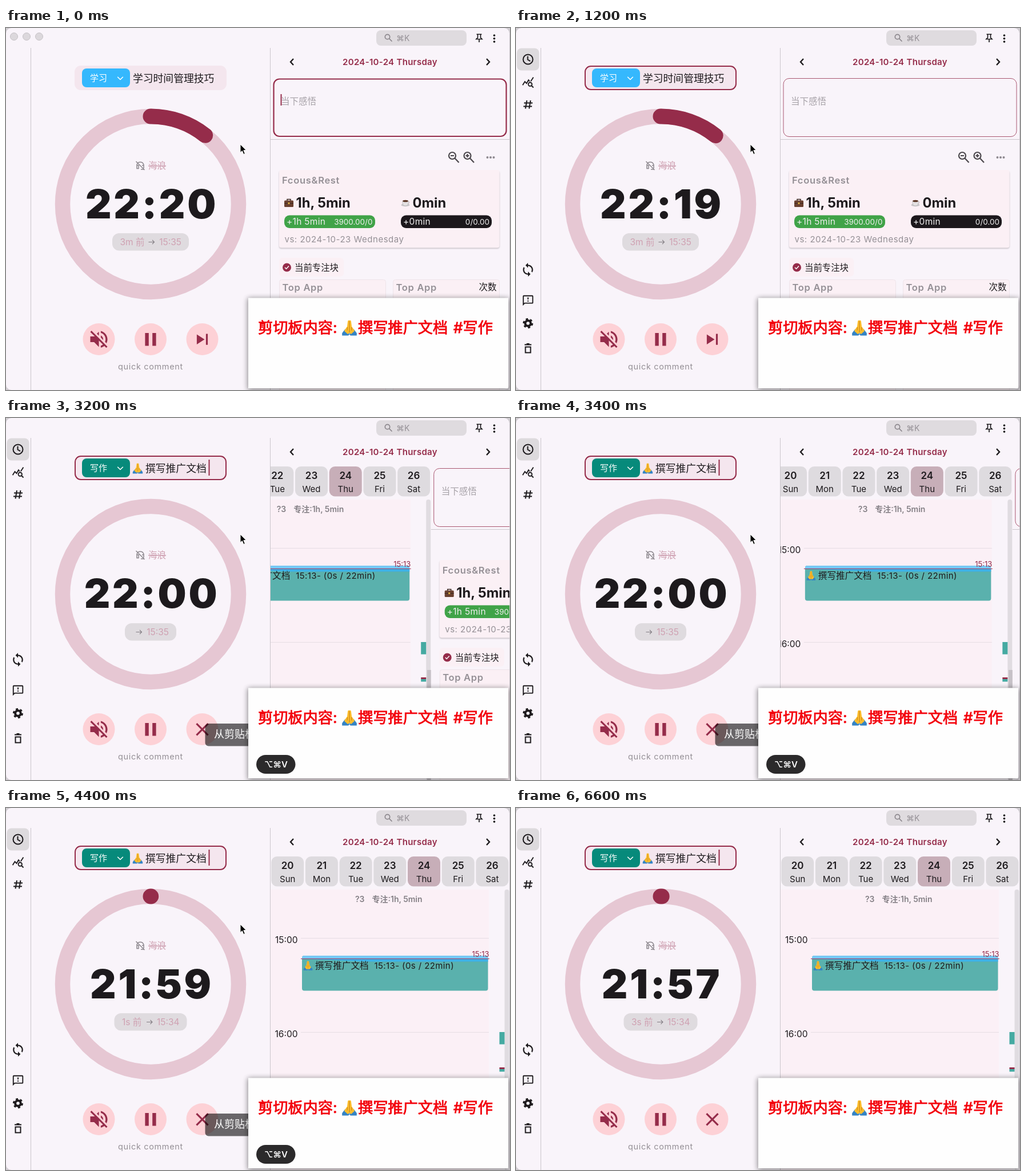
An HTML page that plays this animation: 882x635 px, repeating every 6800 ms.

```html
<!DOCTYPE html>
<html lang="zh">
<head>
<meta charset="utf-8">
<title>Focus timer</title>
<style>
  html, body { margin: 0; width: 100%; height: 100%; overflow: hidden; background: #d3cfd4; }
  svg.stage { display: block; width: 882px; height: 635px; }
  text { font: 400 15px Inter, "Noto Sans CJK SC", "DejaVu Sans", sans-serif; fill: #1d1a1d; }
  .mid { text-anchor: middle; }
  .end { text-anchor: end; }
  .gray { fill: #959096; }
  .wine { fill: #952c4a; }
  .rose { fill: #cfa1b2; font-size: 15.5px; }
  .white { fill: #fff; }
  .head { font-size: 16.5px; font-weight: 600; letter-spacing: .7px; }
  .big { font-size: 23.7px; font-weight: 700; }
  .stat { font-size: 15.5px; letter-spacing: .3px; fill: #eee; }
  .num { font-size: 13.5px; fill: #eee; }
  .title { font-size: 17.8px; }
  .clip { font-size: 26.2px; fill: #f3000b; stroke: #f3000b; stroke-width: .8px; }
  .focus { font-size: 14px; font-weight: 600; fill: #858086; }
  .timer { font-size: 70.5px; font-weight: 900; letter-spacing: 3.8px; }
  .line { fill: none; stroke: #1d1a1d; stroke-width: 2; }
  .rule { stroke: #cbc6cc; }
  #pages { animation: slide 6.8s infinite linear; }
  #pointer { animation: point 6.8s infinite linear; }
  @keyframes slide {
    0% { transform: translateX(0); }
    44.118% { transform: translateX(0); animation-timing-function: ease; }
    51.65%, 100% { transform: translateX(418px); }
  }
  @keyframes point {
    0% { transform: translate(410px, 204px); }
    66.2% { transform: translate(410px, 204px); animation-timing-function: ease-in-out; }
    76.5%, 100% { transform: translate(260px, 561px); }
  }
</style>
</head>
<body>
<svg class="stage" viewBox="0 0 882 635">
  <defs>
    <clipPath id="panel"><rect x="463" y="72" width="418" height="563"/></clipPath>
    <filter id="soft" x="-10%" y="-20%" width="120%" height="140%"><feGaussianBlur stdDeviation="5"/></filter>
    <filter id="faint" x="-5%" y="-10%" width="110%" height="120%"><feGaussianBlur stdDeviation="1"/></filter>
    <symbol id="pray" viewBox="0 0 24 24">
      <path d="M1 20l4.500-6 7 7-2 2.500H1zM23 20l-4.500-6-7 7 2 2.500H23z" fill="#3584c4"/>
      <path d="M12 1c-1.500-1-2.500 0-2.600 2L8.500 10 5 15l-.5 2 5 4.500 2.500-2 2.500 2 5-4.500-.5-2-3.500-5-.9-7c-.1-2-1.100-3-2.600-2z" fill="#fdbf2d"/>
      <path d="M12 2v17M9 11l-.5 5M15 11l.5 5" stroke="#c9831c" fill="none"/>
    </symbol>
    <symbol id="down" viewBox="0 0 10 6"><path d="M1 1l4 4 4-4" fill="none" stroke="#fff" stroke-width="1.300"/></symbol>
  </defs>

  <rect x="-.5" y="-.5" width="882" height="636" rx="10" fill="#f9f4fa" stroke="#c8c3c9"/>
  <path class="rule" d="M43.500 35V635M462.500 35V635"/>

  <!-- Title bar -->
  <g on="0 200" fill="#dcd8dc" stroke="#c6c2c6">
    <circle cx="14" cy="15" r="6.500"/><circle cx="36" cy="15" r="6.500"/><circle cx="58" cy="15" r="6.500"/>
  </g>
  <rect x="648" y="4" width="158" height="27" rx="8" fill="#dfdbdf"/>
  <g fill="none" stroke="#8b868c" stroke-width="1.700"><circle cx="667.500" cy="15.500" r="4.200"/><path d="M670.500 18.500l5 5"/></g>
  <text x="683" y="23" class="gray" style="font-size:14px">⌘K</text>
  <path d="M823.500 11h9M825.500 11v6l-2.500 2.500h10l-2.500-2.500v-6M828 19.500v5.500" class="line" style="stroke-width:1.700"/>
  <g><circle cx="854.500" cy="13" r="1.800"/><circle cx="854.500" cy="18.500" r="1.800"/><circle cx="854.500" cy="24" r="1.800"/></g>

  <!-- Side bar -->
  <g on="200">
    <rect x="1.500" y="35.500" width="39" height="39" rx="8" fill="#dddadd"/>
    <g class="line">
      <circle cx="21" cy="55" r="8.500"/><path d="M20.500 49.500v6l4.500 2.700"/>
      <g transform="translate(10 84) scale(.92)">
        <path d="M1.800 17.600L6 10.800l3.200 3.500L13 7.800l2 2.600M17.200 10.300l5-7.700M18.500 18.500l3.800 3.800"/><circle cx="16" cy="16" r="3.500"/>
      </g>
      <path d="M19 127l-2.500 14.500M25.500 127L23 141.500M14 131.500h15M13 137.500h15"/>
      <path d="M15 555.500h12M18.500 554h5M16.500 559.500v10h9v-10z"/>
      <circle cx="21" cy="518" r="4.800" style="stroke-width:4"/>
      <circle cx="21" cy="518" r="7.500" pathLength="60" stroke-dasharray="5 5" style="stroke-width:3"/>
    </g>
    <path transform="translate(7.800 410.800) scale(1.100)" fill="#1d1a1d" d="M12 4V1L8 5l4 4V6c3.310 0 6 2.690 6 6 0 1-.25 1.970-.7 2.800l1.460 1.460C19.540 15 20 13.570 20 12c0-4.420-3.580-8-8-8zm0 14c-3.310 0-6-2.690-6-6 0-1 .25-1.970.7-2.800L5.240 7.740C4.460 8.970 4 10.430 4 12c0 4.420 3.580 8 8 8v3l4-4-4-4v3z"/>
    <path transform="translate(10 467) scale(.92)" fill="#1d1a1d" d="M20 2H4a2 2 0 0 0-2 2v18l4-4h14a2 2 0 0 0 2-2V4a2 2 0 0 0-2-2zm0 14H5.200L4 17.200V4h16zm-9-4h2v2h-2zm0-6h2v4h-2z"/>
  </g>

  <!-- Task field -->
  <rect x="120" y="66" width="266" height="43" rx="11" fill="#f4e6ee"/>
  <rect on="200" x="121" y="67" width="264" height="41" rx="10" fill="none" stroke="#952c4a" stroke-width="2"/>
  <g on="0 3000">
    <rect x="133" y="71" width="84" height="33" rx="8" fill="#35b8fd"/>
    <text x="147" y="93" class="white">学习</text>
    <text x="222" y="95" class="title">学习时间管理技巧</text>
  </g>
  <g on="3000">
    <rect x="133" y="71" width="84" height="33" rx="8" fill="#078a7b"/>
    <text x="147" y="93" class="white">写作</text>
    <use href="#pray" x="221" y="79" width="19" height="19"/>
    <text x="244" y="95" class="title">撰写推广文档</text>
  </g>
  <use href="#down" x="194" y="84.500" width="12" height="7.200"/>
  <rect id="caret" y="73" width="2" height="28" fill="#952c4a"/>

  <!-- Dial -->
  <circle cx="253" cy="309" r="154" fill="none" stroke="#e6c7d3" stroke-width="26.500"/>
  <circle id="arc" cx="253" cy="309" r="154" transform="rotate(-90 253 309)" pathLength="360" fill="none" stroke="#952c4a" stroke-width="27" stroke-linecap="round"/>
  <g id="face">
    <path d="M229 242v-2a6.200 6.200 0 0 1 12 0v6M229 241h3v5.500h-3zM238 241h3v4M241 248h-5M227.500 234l15 15" fill="none" stroke="#8c878d" stroke-width="1.500"/>
    <text x="249" y="247" class="rose" text-decoration="line-through">海浪</text>
    <text id="timer" x="255" y="334" class="timer mid"></text>
  </g>
  <rect id="pill" y="360" height="30.500" rx="12" fill="#dfdbdf"/>
  <text id="ago" y="381" class="rose"></text>
  <path id="arrow" d="M-5 375.500H5M1.500 372l3.500 3.500-3.500 3.500" fill="none" stroke="#827d83" stroke-width="1.100"/>
  <text id="until" y="381" class="rose end"></text>

  <!-- Controls -->
  <rect on="5000 6200" x="117" y="510" width="271.500" height="73" rx="18" fill="#ebe1e6"/>
  <g fill="#fdd1d6"><circle cx="162.500" cy="546" r="28"/><circle cx="253" cy="546" r="28"/><circle cx="343.500" cy="546" r="28"/></g>
  <g class="wine">
    <path transform="translate(142.500 526) scale(1.670)" d="M16.500 12c0-1.770-1-3.290-2.500-4v2.200l2.450 2.450zm2.500 0c0 .94-.2 1.820-.54 2.640l1.510 1.510C20.630 14.900 21 13.500 21 12c0-4.280-3-7.860-7-8.770v2.060c2.900.86 5 3.540 5 6.710zM4.270 3L3 4.270 7.730 9H3v6h4l5 5v-6.730l4.250 4.250c-.67.52-1.420.93-2.250 1.180v2.060c1.380-.31 2.630-.95 3.690-1.810L19.730 21 21 19.730l-9-9zM12 4L9.900 6.100 12 8.200z"/>
    <path transform="translate(233.800 527) scale(1.600)" d="M6 19h4V5H6zM14 5v14h4V5z"/>
    <path on="0 3000" transform="translate(324.300 527) scale(1.600)" d="M6 17.500l8.500-5.500L6 6.500zM16 6v12h2V6z"/>
    <path on="3000" transform="translate(324.300 527) scale(1.600)" d="M6.400 19L5 17.600 10.600 12 5 6.400 6.400 5 12 10.600 17.600 5 19 6.400 13.400 12 19 17.600 17.600 19 12 13.400z"/>
  </g>
  <text x="253" y="599" class="gray mid" style="font-size:14.500px;letter-spacing:.65px">quick comment</text>

  <!-- Date bar -->
  <path d="M503 54l-5 5.500 5 5.500M841 54l5 5.500-5 5.500" class="line" style="stroke-width:2.400"/>
  <text x="672" y="65" class="wine mid" style="font-weight:600;letter-spacing:.3px">2024-10-24 Thursday</text>

  <g clip-path="url(#panel)"><g id="pages">
    <!-- Journal page -->
    <rect on="0 200" x="468.500" y="89.500" width="407" height="100.500" rx="10" fill="none" stroke="#952c4a" stroke-width="2.200"/>
    <rect on="200" x="468" y="88.500" width="408" height="102" rx="10" fill="none" stroke="#a95670"/>
    <text x="481" y="134" style="font-size:15.500px;fill:#a6a1a7">当下感悟</text>
    <rect on="0 200" x="480.500" y="116" width="2" height="20" fill="#952c4a"/>
    <path class="rule" d="M463 195.500H882"/>
    <g fill="none" stroke="#4b474c" stroke-width="2.200">
      <circle cx="781" cy="224" r="6"/><path d="M785.500 228.500l7 7.500M778 224h6"/>
      <circle cx="807.500" cy="224" r="6"/><path d="M812 228.500l7 7.500M804.500 224h6M807.500 221v6"/>
    </g>
    <g fill="#8f8a90"><circle cx="842.500" cy="227" r="2"/><circle cx="848" cy="227" r="2"/><circle cx="853.500" cy="227" r="2"/></g>

    <rect x="478" y="251" width="385.500" height="136" rx="4" fill="#b5aeb4" opacity=".75" filter="url(#faint)"/>
    <rect x="478" y="249" width="385.500" height="136.500" rx="4" fill="#fbf0f5"/>
    <text x="483" y="273" class="head gray">Fcous&amp;Rest</text>
    <path d="M492 303v-2.500h6v2.500" fill="none" stroke="#3a2620" stroke-width="1.500"/>
    <rect x="487" y="302.500" width="16" height="11.500" rx="1.500" fill="#6a4030"/>
    <path d="M487 307.500h16" stroke="#3a2620"/><rect x="493.500" y="306" width="3" height="3" fill="#d9a93c"/>
    <text x="507.500" y="315" class="big">1h, 5min</text>
    <ellipse cx="699" cy="310.500" rx="7.500" ry="2.500" fill="#c8c6c8"/>
    <path d="M694 303.500h10v4a5 4.500 0 0 1-10 0z" fill="#e4e2e3" stroke="#aaa6a8" stroke-width=".6"/>
    <ellipse cx="699" cy="303.500" rx="4.800" ry="1.800" fill="#5a3524"/><path d="M704 304.500q4 0 0 4" fill="none" stroke="#bbb7b9"/>
    <text x="711.500" y="315" class="big">0min</text>
    <rect x="487" y="328.500" width="159" height="22.500" rx="9" fill="#40a348"/>
    <text x="491" y="345" class="stat">+1h 5min</text><text x="641.500" y="344.500" class="num end">3900.00/0</text>
    <rect x="691" y="328.500" width="159" height="22.500" rx="9" fill="#1c181c"/>
    <text x="695" y="345" class="stat">+0min</text><text x="846" y="344.500" class="num end">0/0.00</text>
    <text x="487.500" y="376" class="gray" style="letter-spacing:.5px">vs: 2024-10-23 Wednesday</text>

    <rect x="478" y="403" width="113" height="33" rx="6" fill="#fbf0f5"/>
    <circle cx="491.500" cy="420" r="7.500" fill="#952c4a"/><path d="M488 420l2.500 2.500 4.500-5" fill="none" stroke="#fff" stroke-width="1.500"/>
    <text x="505" y="425.500" style="font-size:15.400px">当前专注块</text>
    <g stroke="#eee4ea" fill="#fbf0f5"><rect x="478.500" y="441.500" width="186" height="200" rx="4"/><rect x="677.500" y="441.500" width="186" height="200" rx="4"/></g>
    <text x="483.500" y="461" class="head gray">Top App</text><text x="682.500" y="461" class="head gray">Top App</text>
    <text x="827.500" y="459.500" style="font-size:15.500px">次数</text>

    <!-- Calendar page -->
    <g transform="translate(-418)">
      <g id="week"></g>
      <rect x="463" y="143" width="382" height="492" fill="#fbf0f6"/>
      <text x="611" y="165" class="focus">?3</text>
      <text x="640.500" y="165" class="focus">专注:1h, 5min</text>
      <path d="M516 228.500H845M516 393.500H845" stroke="#e6dde4"/>
      <text x="510.500" y="237" class="end" style="font-size:15.500px">15:00</text>
      <text x="510.500" y="402" class="end" style="font-size:15.500px">16:00</text>
      <rect x="518" y="259" width="325.500" height="61.500" rx="4" fill="#5ab1ad"/>
      <path d="M518 264v-1q0-4 4-4h317.500q4 0 4 4v1z" fill="#76c9f5"/>
      <path d="M518 264.500H843.500v5H630z" fill="#3fb0e6"/>
      <path d="M516 264.500H846" stroke="#a53a62"/>
      <text x="845.500" y="261" class="wine end" style="font-size:13px">15:13</text>
      <use href="#pray" x="520" y="268" width="17" height="17"/>
      <text x="541" y="282" style="font-size:15.600px">撰写推广文档</text>
      <text x="644.500" y="281.500" style="letter-spacing:.4px">15:13- (0s / 22min)</text>
      <rect x="872.500" y="143" width="8" height="492" rx="4" fill="#e0dce1"/>
      <rect on="3000 3600" x="874" y="442" width="7" height="193" fill="#c6c1c7"/>
      <path d="M863.500 393h9v21.500h-9zM863.500 458h9v4.500h-9z" fill="#45aaa2"/><path d="M863.500 455h9v3h-9z" fill="#952c4a"/>
    </g>
  </g></g>

  <!-- Toast -->
  <g on="3200 4800">
    <rect x="348.500" y="536" width="184" height="39.500" rx="6" fill="#000" opacity=".58"/>
    <text x="364" y="561" class="white" style="font-size:18px">从剪贴板粘贴</text>
  </g>

  <!-- Clipboard window -->
  <rect x="423" y="474" width="457" height="161" fill="#000" opacity=".45" filter="url(#soft)"/>
  <rect x="424" y="473.500" width="455" height="158.500" fill="#fefefe"/>
  <text x="441" y="535" class="clip">剪切板内容:</text>
  <use href="#pray" x="587" y="512" width="28" height="28"/>
  <text x="616" y="535" class="clip">撰写推广文档</text>
  <text x="852" y="535" class="clip end">#写作</text>
  <g on="2800 5000">
    <rect x="438" y="591" width="68.500" height="33" rx="16.500" fill="#2b2a2b"/>
    <text x="472.500" y="613" class="white mid" style="font-weight:600">⌥⌘V</text>
  </g>

  <g id="pointer">
    <path on="0 5000" d="M0 0V14.500L3.300 11.500 5.800 17.500 8.300 16.500 5.800 10.500H10.300z" fill="#000" stroke="#fff"/>
    <path on="5000 6200" d="M-2 2.500a1.800 1.800 0 0 1 3.500-1l2 6q1-1.500 2.700 0 1.300-1 2.500.6 1.800-.6 2.300 1.400l.8 5-1.500 4H3L-3.500 12q-1-2.500 1.500-2.200l2 1.500z" fill="#fff" stroke="#000" stroke-width="1.200"/>
  </g>
</svg>

<script>
const LOOP = 6800;
const $ = id => document.getElementById(id);

// start, seconds left, session length, elapsed label, end time, pill width
const ticks = [
  [0, 1340, 1500, '3m 前', '15:35', 134],
  [200, 1339, 1500, '3m 前', '15:35', 134],
  [1300, 1338, 1500, '3m 前', '15:35', 134],
  [2400, 1337, 1500, '3m 前', '15:35', 134],
  [3000, 1320, 1320, '', '15:35', 90],
  [4000, 1319, 1320, '1s 前', '15:34', 127],
  [5000, 1318, 1320, '2s 前', '15:34', 128.5],
  [6000, 1317, 1320, '3s 前', '15:34', 129],
];

$('week').innerHTML = ['Sun', 'Mon', 'Tue', 'Wed', 'Thu', 'Fri', 'Sat'].map((day, i) => {
  const x = 492.7 + 59.7 * i;
  return `<rect x="${x - 28.5}" y="85" width="57" height="52.5" rx="10" fill="${i === 4 ? '#c7aeb8' : '#dedbdf'}"/>
    <text x="${x}" y="107" class="mid" style="font-size:17px;font-weight:600">${20 + i}</text>
    <text x="${x}" y="130" class="mid">${day}</text>`;
}).join('');

const timed = [...document.querySelectorAll('[on]')].map(el => {
  const [from, to = LOOP] = el.getAttribute('on').split(' ').map(Number);
  return { el, from, to };
});

const show = (el, on) => { el.style.visibility = on ? 'visible' : 'hidden'; };
const pad = n => String(n).padStart(2, '0');
let shown;

function setDial(tick) {
  if (tick === shown) return;
  shown = tick;
  const [, left, total, ago, until, width] = tick;
  const fresh = left === total, right = 253 + width / 2;
  $('timer').textContent = pad(Math.floor(left / 60)) + ':' + pad(left % 60);
  $('face').setAttribute('transform', `translate(0 ${fresh ? -1 : 0})`);
  $('arc').setAttribute('stroke-dasharray', `${(1 - left / total) * 360} 360`);
  show($('arc'), !fresh);
  $('pill').setAttribute('x', 253 - width / 2);
  $('pill').setAttribute('width', width);
  $('ago').setAttribute('x', 266.5 - width / 2);
  $('ago').textContent = ago;
  $('arrow').setAttribute('transform', `translate(${right - 65.5})`);
  $('until').setAttribute('x', right - 13);
  $('until').textContent = until;
}

function draw(t) {
  timed.forEach(({ el, from, to }) => show(el, t >= from && t < to));
  setDial(ticks.findLast(row => row[0] <= t));
  const late = t >= 3000;
  const beat = Math.floor(Math.max(0, t - (late ? 3200 : 300)) / 500);
  $('caret').setAttribute('x', late ? 354.5 : 368);
  show($('caret'), t >= 200 && beat % 2 === 0);
}

let start;
function loop(now) {
  start ??= now;
  draw((now - start) % LOOP);
  requestAnimationFrame(loop);
}
draw(0);
requestAnimationFrame(loop);
</script>
</body>
</html>
```
